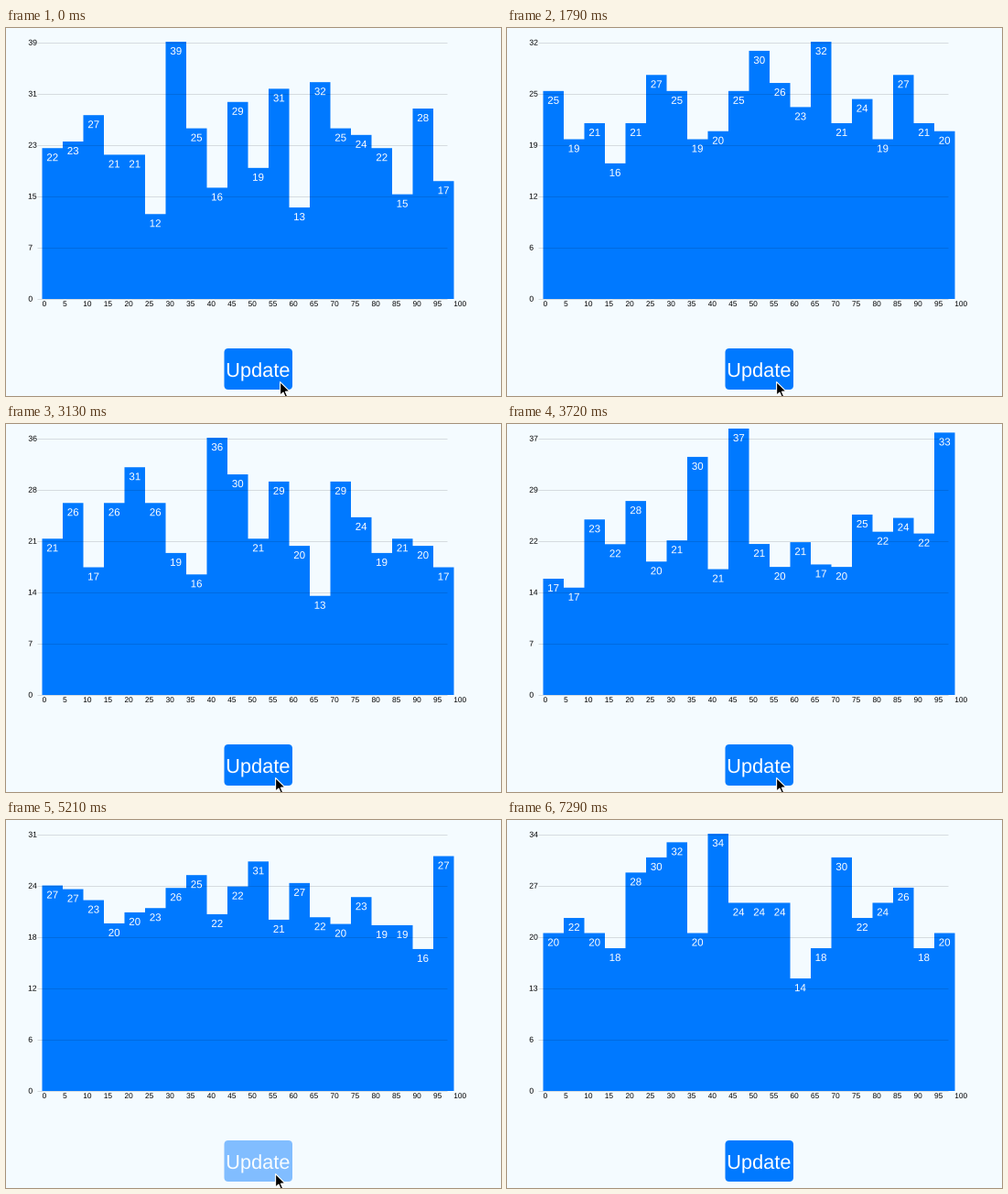
Write a matplotlib script that moves like this. It is 541 by 402 pixels and loops after 8390 ms.

```python
import math

import matplotlib.pyplot as plt
import numpy as np
from matplotlib.animation import FuncAnimation
from matplotlib.patches import FancyBboxPatch, PathPatch, Polygon
from matplotlib.path import Path
from matplotlib.textpath import TextPath

W, H, DPI = 541, 402, 64
PT = 72 / DPI                      # points per pixel
LOOP, TICK = 8390, 10              # ms

BG = np.array([244, 251, 255]) / 255
BLUE = np.array([0, 121, 255]) / 255
WHITE = np.ones(3)

LEFT, STEP, BASE, PLOT_H = 39.5, 22.5, 296, 281
GRID_Y = [15.5 + 56 * k for k in range(6)]

DATA = [
    [22, 23, 27, 21, 21, 12, 39, 25, 16, 29, 19, 31, 13, 32, 25, 24, 22, 15, 28, 17],
    [25, 19, 21, 16, 21, 27, 25, 19, 20, 25, 30, 26, 23, 32, 21, 24, 19, 27, 21, 20],
    [21, 26, 17, 26, 31, 26, 19, 16, 36, 30, 21, 29, 20, 13, 29, 24, 19, 21, 20, 17],
    [17, 17, 23, 22, 28, 20, 21, 30, 21, 37, 21, 20, 21, 17, 20, 25, 22, 24, 22, 33],
    [27.4, 26.8, 23.2, 19.7, 19.7, 22.8, 25.8, 25.2, 21.5, 21.5,
     31, 20.9, 26.6, 22.2, 20.2, 23.1, 19.4, 18.8, 15.5, 27.4],
    [20, 22, 20, 18, 28, 30, 32, 20, 34, 24, 24, 24, 14, 18, 30, 22, 24, 26, 18, 20],
]

# press time, settle time, visible steps between them, delay until release (ms)
TAPS = [
    (900, 1790, 6, 42),
    (2240, 3130, 6, 10),
    (3420, 4320, 6, 10),
    (4920, 5650, 5, 0),
    (5950, 6840, 6, 57),
]
CURSOR_MOVES, CURSOR_LEAVES = 150, 7290


def bar_heights(values):
    top = max(values)
    return PLOT_H * np.minimum(np.array(values) + 0.87, top) / top


HEIGHTS = [bar_heights(values) for values in DATA]


def spring(s, omega=11.2, zeta=0.4):
    root = math.sqrt(1 - zeta * zeta)
    a = omega * root * s
    return 1 - math.exp(-zeta * omega * s) * (math.cos(a) + zeta / root * math.sin(a))


def button_opacity(s):
    u = min(max((s - 0.04) / 0.27, 0), 1)
    return 0.2 + 0.8 * u * u * (3 - 2 * u)


def chart_state(ms):
    """Bar heights, index of the labelled data set, and button opacity."""
    current = 0
    for i, (press, settle, steps, delay) in enumerate(TAPS):
        if ms >= settle:
            current = i + 1
        elif ms >= press:
            k = (ms - press) * steps // (settle - press)
            s = (k * (settle - press) / steps - delay) / 1000
            if s <= 0 and k == 0:
                return HEIGHTS[i], i, 0.2
            mix = HEIGHTS[i] + (HEIGHTS[i + 1] - HEIGHTS[i]) * spring(s)
            return mix, i + 1, button_opacity(s)
    return HEIGHTS[current], current, 1.0


glyphs = {}


def text_path(text, size, x, baseline, centred=False):
    """Outline of a text with its ink starting at, or centred on, x."""
    key = text, size
    if key not in glyphs:
        path = TextPath((0, 0), text, size=size, prop={"family": "Liberation Sans"})
        box = path.get_extents()
        glyphs[key] = path, box.x0, box.width
    path, ink, width = glyphs[key]
    x -= ink + (width / 2 if centred else 0)
    return Path(path.vertices * [1, -1] + [x, baseline], path.codes)


def join(paths):
    return Path.make_compound_path(*paths)


def bar_outline(heights):
    edges = LEFT + STEP * np.arange(len(heights) + 1)
    xs = np.repeat(edges, 2)
    ys = np.concatenate([[BASE], np.repeat(BASE - heights, 2), [BASE]])
    return np.column_stack([xs, ys])


def bar_labels(heights, values):
    return join([
        text_path(f"{v:.0f}", 11.5, LEFT + STEP * (i + 0.5), BASE - h + 14, True)
        for i, (h, v) in enumerate(zip(heights, values))
    ])


def axis_labels(top):
    return join([
        text_path(str(int(top * (5 - k) / 5)), 8.6, 24.7, y + 3.2)
        for k, y in enumerate(GRID_Y)
    ])


fig = plt.figure(figsize=(W / DPI, H / DPI), dpi=DPI, facecolor=BG)
ax = fig.add_axes([0, 0, 1, 1])
ax.set_xlim(0, W)
ax.set_ylim(H, 0)
ax.axis("off")


def add_text(path, color, z):
    return ax.add_patch(PathPatch(path, facecolor=color, lw=0, zorder=z))


bars = ax.add_patch(Polygon(bar_outline(HEIGHTS[0]), facecolor=BLUE, lw=0,
                            snap=False, zorder=1))
ax.hlines(GRID_Y, 34, 482, colors=[(0, 0, 0, 0.12)], lw=PT, zorder=2)
counts = add_text(bar_labels(HEIGHTS[0], DATA[0]), WHITE, 3)
y_axis = add_text(axis_labels(max(DATA[0])), "black", 3)
add_text(join([text_path(str(5 * i), 8.3, LEFT + STEP * i + 0.4, 304)
               for i in range(21)]), "black", 3)

button = ax.add_patch(FancyBboxPatch(
    (238.5, 350), 74.5, 45, boxstyle="round,pad=0,rounding_size=4.5",
    facecolor=BLUE, lw=0, zorder=1))
caption = add_text(text_path("Update", 21.8, 275.7, 381, True), WHITE, 3)

ARROW = np.array([(0, 0), (0, 14.6), (3.4, 11.5), (5.7, 16.8), (8.1, 15.8),
                  (5.8, 10.6), (10.4, 10.3)])
cursor = ax.add_patch(Polygon(ARROW, facecolor="black", edgecolor="white",
                              lw=1.1 * PT, joinstyle="round", zorder=5))


def update(frame):
    ms = frame * TICK
    heights, shown, opacity = chart_state(ms)
    bars.set_xy(bar_outline(heights))
    counts.set_path(bar_labels(heights, DATA[shown]))
    y_axis.set_path(axis_labels(max(DATA[shown])))
    button.set_facecolor(BG + (BLUE - BG) * opacity)
    caption.set_facecolor(BG + (WHITE - BG) * opacity)
    cursor.set_xy(ARROW + [299.6 if ms < CURSOR_MOVES else 294.6, 386.6])
    cursor.set_visible(ms < CURSOR_LEAVES)
    return bars, counts, y_axis, button, caption, cursor


anim = FuncAnimation(fig, update, frames=LOOP // TICK, interval=TICK,
                     repeat=True, repeat_delay=0, cache_frame_data=False)
plt.show()
```
